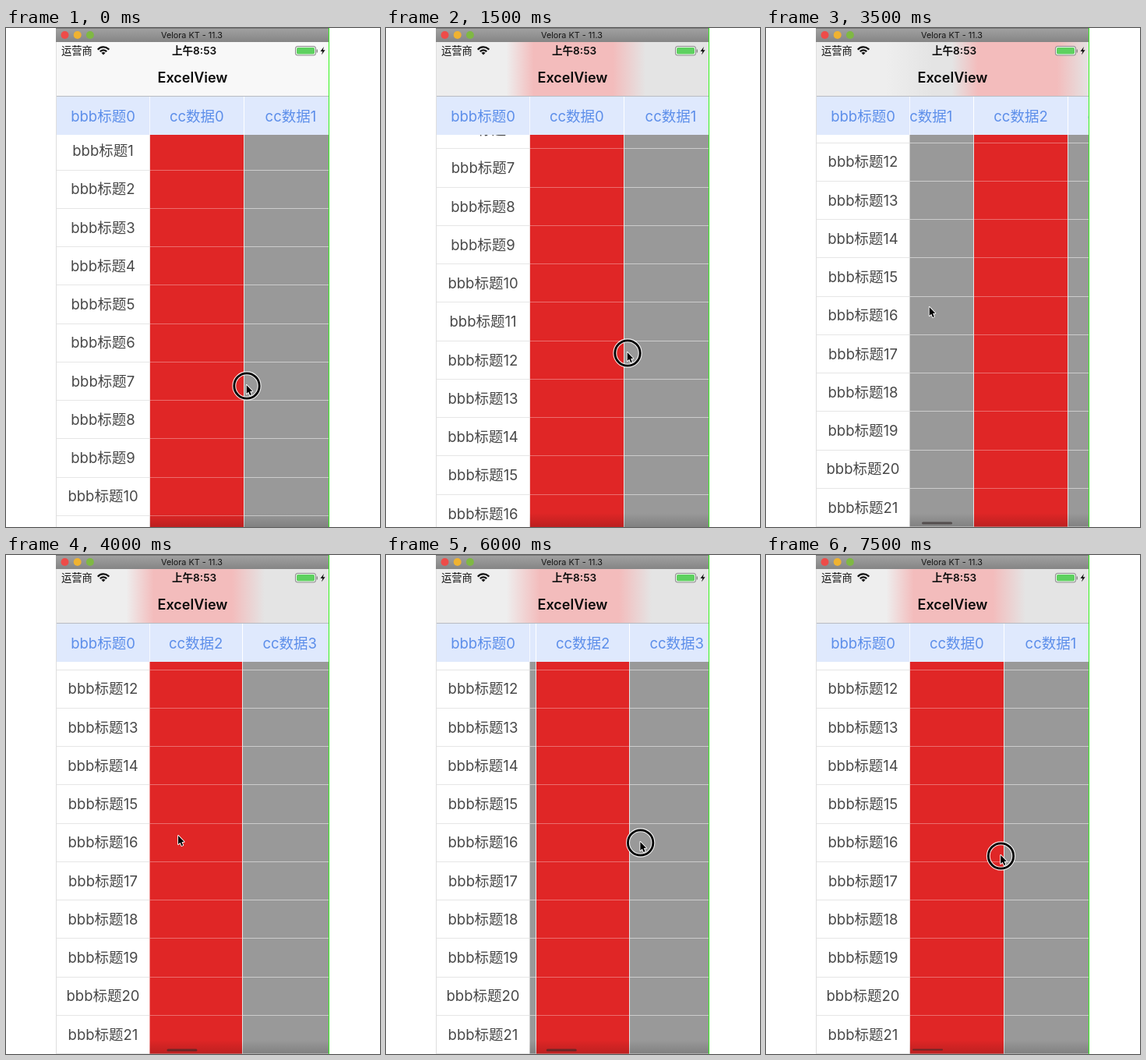
An HTML page with a canvas that plays this animation: 480x640 px, repeating every 8 s.

```html
<!DOCTYPE html>
<html lang="zh">
<head>
<meta charset="utf-8">
<style>
html, body { margin: 0; width: 480px; height: 640px; overflow: hidden; background: #fff; }
canvas { display: block; }
</style>
</head>
<body>
<canvas id="stage" width="480" height="640"></canvas>
<script>
const ctx = document.getElementById('stage').getContext('2d');
const FONT = 'Inter, "Noto Sans CJK SC", "Noto Sans CJK", sans-serif';
const LEFT = 64, RIGHT = 414, SPLIT = 184.5, WIDTH = RIGHT - LEFT;
const COL = 120.6, ROW = 49.25, ROWS = 21;
const LOOP = 8, TICK = 0.5; // seconds

// Gestures as [second, value] key points: flick down twice, swipe across, swipe back.
const scrollY = track([0, 0], [1.5, 273.3], [2.5, 527.5]);
const scrollX = track([2.5, 0], [3.5, 159], [5, 409], [6.5, 145.5], [7.5, 0]);
const pointerX = track([0, 309], [1.5, 310], [2.5, 351], [3.5, 210], [5, 244], [6.5, 368], [7.5, 301.5]);
const pointerY = track([0, 459], [1.5, 417], [2.5, 314], [3.5, 359], [5, 365], [6.5, 371], [7.5, 386]);

function track(...keys) {
  return t => {
    const next = keys.findIndex(([time]) => time >= t);
    if (next < 0) return keys[keys.length - 1][1];
    if (next === 0) return keys[0][1];
    const [[t0, v0], [t1, v1]] = keys.slice(next - 1);
    return v0 + (v1 - v0) * (t - t0) / (t1 - t0);
  };
}

function rect(x, y, w, h, color) {
  ctx.fillStyle = color;
  ctx.fillRect(x, y, w, h);
}

function pill(x, y, w, h, r, color) {
  ctx.fillStyle = color;
  ctx.beginPath();
  ctx.roundRect(x, y, w, h, r);
  ctx.fill();
}

function text(str, x, y, size, color, weight = 400, align = 'center') {
  ctx.font = `${weight} ${size}px ${FONT}`;
  ctx.textAlign = align;
  ctx.fillStyle = color;
  ctx.fillText(str, x, y + size * 0.36);
}

function circle(x, y, r) {
  ctx.beginPath();
  ctx.arc(x, y, r, 0, 7);
}

function poly(points, color) {
  ctx.fillStyle = color;
  ctx.beginPath();
  points.forEach(([x, y]) => ctx.lineTo(x, y));
  ctx.closePath();
  ctx.fill();
}

function vertical(y0, y1, from, to) {
  const g = ctx.createLinearGradient(0, y0, 0, y1);
  g.addColorStop(0, from);
  g.addColorStop(1, to);
  return g;
}

function clipped(x, y, w, h, draw) {
  ctx.save();
  ctx.beginPath();
  ctx.rect(x, y, w, h);
  ctx.clip();
  draw();
  ctx.restore();
}

function eachColumn(sx, draw) {
  for (let i = Math.floor(sx / COL); SPLIT + i * COL - sx < RIGHT; i++) draw(i, SPLIT + i * COL - sx);
}

function eachRow(sy, draw) {
  for (let n = 1; n <= ROWS; n++) draw(n, 182 + (n - 1) * ROW - sy);
}

function table(sx, sy) {
  rect(LEFT, 88, WIDTH, 552, '#fff');
  clipped(LEFT, 137, SPLIT - LEFT, 503, () => eachRow(sy, (n, bottom) => {
    text('bbb标题' + n, 124.5, bottom - 24.6, 18.5, '#484848');
    rect(LEFT, Math.floor(bottom), SPLIT - LEFT, 1, '#e6e6e6');
  }));
  clipped(SPLIT, 137, RIGHT - SPLIT, 503, () => eachColumn(sx, (i, x) => {
    const gray = i % 2;
    rect(x, 137, COL, 503, gray ? '#999' : '#e02626');
    eachRow(sy, (n, bottom) =>
      rect(x, Math.floor(bottom), COL, 1, `rgba(255,255,255,${gray ? 0.5 : 0.33})`));
    rect(Math.floor(x), 137, 1, 503, '#e6e6e6');
  }));
  rect(SPLIT, 622, RIGHT - SPLIT, 18, vertical(622, 640, 'rgba(0,0,0,0)', 'rgba(0,0,0,.16)'));
}

function header(sx) {
  rect(LEFT, 88, WIDTH, 49, '#dfe9fd');
  clipped(SPLIT, 88, RIGHT - SPLIT, 49, () => eachColumn(sx, (i, x) => {
    rect(Math.floor(x), 88, 1, 49, '#fff');
    text('cc数据' + i, x + COL / 2, 113, 18.5, '#5c8eea');
  }));
  text('bbb标题0', 124.5, 113, 18.5, '#5c8eea');
  rect(184, 88, 1, 49, '#f6f9ff');
}

// Translucent bar: the columns below show through as soft bands.
function navBar(sx, sy) {
  rect(LEFT, 18, WIDTH, 70, '#f8f8f8');
  const bands = ctx.createLinearGradient(LEFT - COL, 0, RIGHT + COL, 0);
  const stop = (x, color) => bands.addColorStop((x - LEFT + COL) / (WIDTH + 2 * COL), color);
  stop(SPLIT - 30, '#eeeeee');
  eachColumn(sx, (i, x) => {
    const gray = i % 2;
    const from = Math.max(x, SPLIT) + (gray ? 28 : 5), to = x + COL - (gray ? 28 : 14);
    if (to <= from) return;
    const tint = gray ? '#e4e4e4' : '#f3bcbc';
    stop(from, tint);
    stop(to, tint);
  });
  ctx.globalAlpha = Math.min(1, sy / 130);
  rect(LEFT, 18, WIDTH, 70, bands);
  ctx.globalAlpha = 1;
  rect(LEFT, 87, WIDTH, 1, '#b9bcc2');
  text('ExcelView', 239.5, 64, 18, '#0a0a0a', 600);
}

function statusBar() {
  text('运营商', 71, 29.5, 13.3, '#111', 400, 'left');
  text('上午8:53', 241.5, 29.5, 13.6, '#111', 600);
  ctx.strokeStyle = '#111';
  ctx.lineWidth = 2.3;
  for (const r of [5.6, 9.6]) {
    ctx.beginPath();
    ctx.arc(125, 34, r, -Math.PI * 0.77, -Math.PI * 0.23);
    ctx.stroke();
  }
  poly([[125, 34.5], [122.4, 31.8], [125, 30.7], [127.6, 31.8]], '#111');
  pill(371, 23, 27, 12.5, 3.5, '#8a8a8a');
  pill(372, 24, 25, 10.5, 2.5, '#f4f4f4');
  pill(373, 25, 23, 8.5, 1.8, '#5ed160');
  rect(398.6, 27.5, 1.4, 4, '#8a8a8a');
  poly([[408, 24], [403.5, 30], [406.3, 30], [405, 34.5], [409.6, 28.2], [406.8, 28.2]], '#111');
}

function windowFrame() {
  rect(LEFT, 0, WIDTH, 18, vertical(0, 18, '#a2a2a2', '#858585'));
  rect(LEFT, 0, WIDTH, 1, '#777');
  ['#ee4c49', '#efb231', '#7fb843'].forEach((color, i) => {
    circle(75.5 + i * 16.2, 9, 5);
    ctx.fillStyle = color;
    ctx.fill();
  });
  text('Velora KT - 11.3', 238.5, 9.5, 10.8, '#151515');
  rect(LEFT, 18, 1, 622, '#dedede');
  rect(RIGHT, 0, 1, 640, '#35f51c');
}

function scrollBar(sx) {
  const height = sx ? 3 : 2;
  pill(188 + sx * 0.076, 633.5, 39, height, height / 2, 'rgba(50,40,40,.6)');
}

function pointer(x, y, pressed) {
  if (pressed) {
    for (const [width, color] of [[5, 'rgba(255,255,255,.85)'], [2.8, '#000']]) {
      circle(x, y, 16.2);
      ctx.strokeStyle = color;
      ctx.lineWidth = width;
      ctx.stroke();
    }
  }
  const arrow = [[0, 0], [0, 11], [2.5, 8.8], [4.3, 13], [6.2, 12.2], [4.4, 8.1], [7.6, 7.8]]
    .map(([dx, dy]) => [x + dx - 0.3, y + dy - 1]);
  poly(arrow, '#000');
  ctx.strokeStyle = '#fff';
  ctx.lineWidth = 1.8;
  ctx.lineJoin = 'round';
  ctx.stroke();
  poly(arrow, '#000');
}

function frame(now) {
  const t = Math.floor(now / 1000 / TICK) * TICK % LOOP;
  const sx = scrollX(t), sy = scrollY(t);
  rect(0, 0, 480, 640, '#fff');
  table(sx, sy);
  header(sx);
  navBar(sx, sy);
  statusBar();
  if (t > 2.5) scrollBar(sx);
  windowFrame();
  pointer(pointerX(t), pointerY(t), t < 2 || t > 4);
  requestAnimationFrame(frame);
}
requestAnimationFrame(frame);
</script>
</body>
</html>
```
